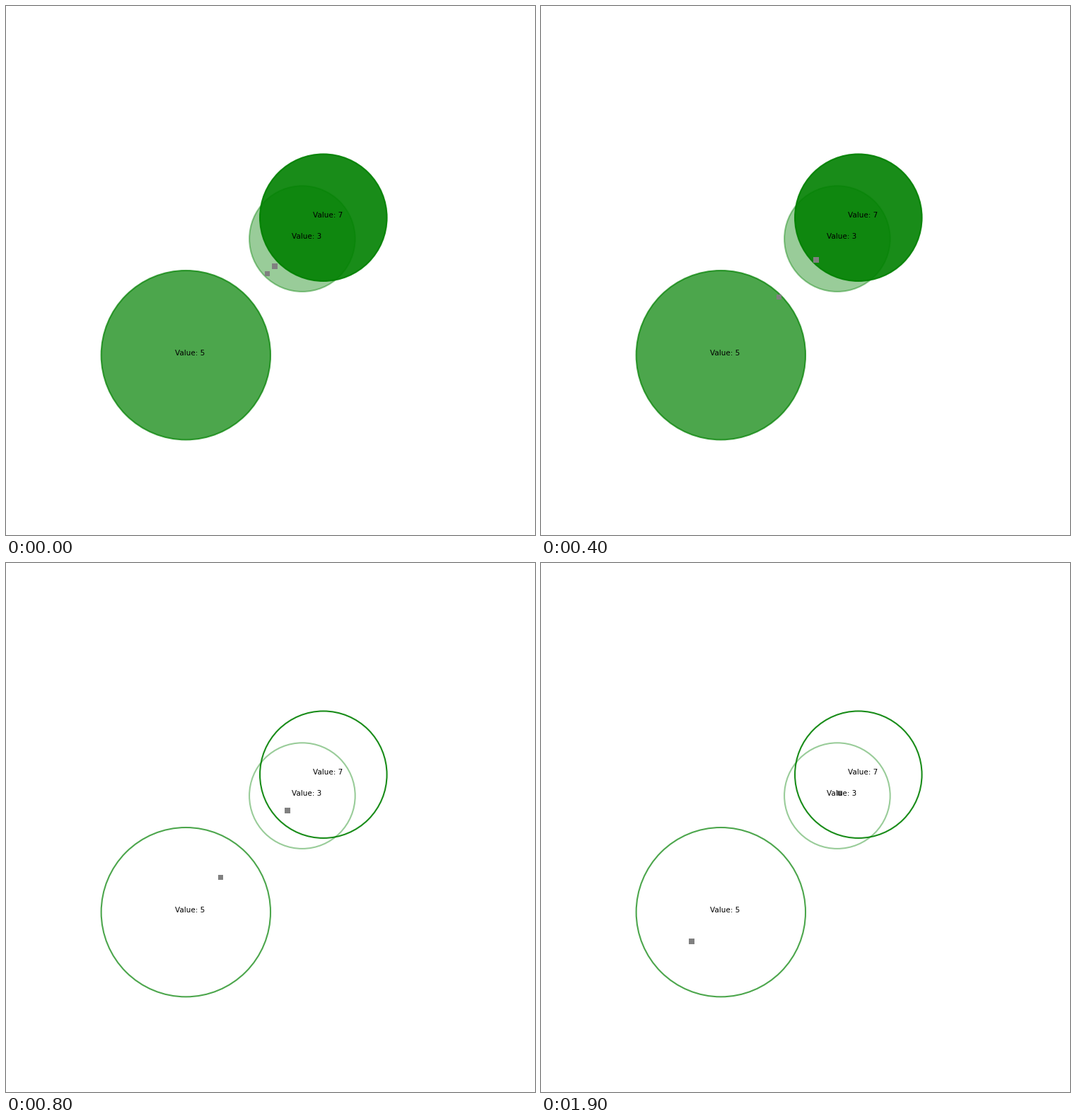
Recreate the animation shown at these times as a matplotlib script. Size 748 px wide and 748 px high, loop 2000 ms.

```python
import matplotlib.pyplot as plt
from matplotlib.animation import FuncAnimation
from matplotlib.patches import Circle, Rectangle

FRAMES, INTERVAL = 20, 100
HALF = 25       # half the width of the world, in units
SIDE = 0.5      # side of a walker

# centre (on the diagonal), radius, value, opacity, step at which it empties
ZONES = [
    (-8, 8, 5, 0.7, 5),
    (3, 5, 3, 0.4, 6),
    (5, 6, 7, 0.9, 6),
]
# start and speed along the diagonal, in units and units per step
WALKERS = [(0.4, 0.15), (-0.3, -0.55)]

plt.rcParams["font.family"] = "DejaVu Sans"
fig = plt.figure(figsize=(10, 10), dpi=74.8, facecolor="white")
ax = fig.add_axes([0, 0, 1, 1])
ax.set(xlim=(-HALF, HALF), ylim=(-HALF, HALF))
ax.axis("off")

circles = []
for c, r, value, alpha, _ in ZONES:
    circles.append(ax.add_patch(
        Circle((c, c), r, color="green", alpha=alpha, lw=2)))
    ax.text(c - 1, c, f"Value: {value}", fontsize=10, color="black")

squares = [ax.add_patch(Rectangle((0, 0), SIDE, SIDE, fc="gray", lw=0))
           for _ in WALKERS]


def update(step):
    for circle, zone in zip(circles, ZONES):
        circle.set_fill(step < zone[-1])
    for square, (start, speed) in zip(squares, WALKERS):
        corner = start + speed * step - SIDE / 2
        square.set_xy((corner, corner))
    return circles + squares


anim = FuncAnimation(fig, update, frames=FRAMES, interval=INTERVAL,
                     init_func=lambda: update(0), repeat=True, repeat_delay=0)
plt.show()
```
